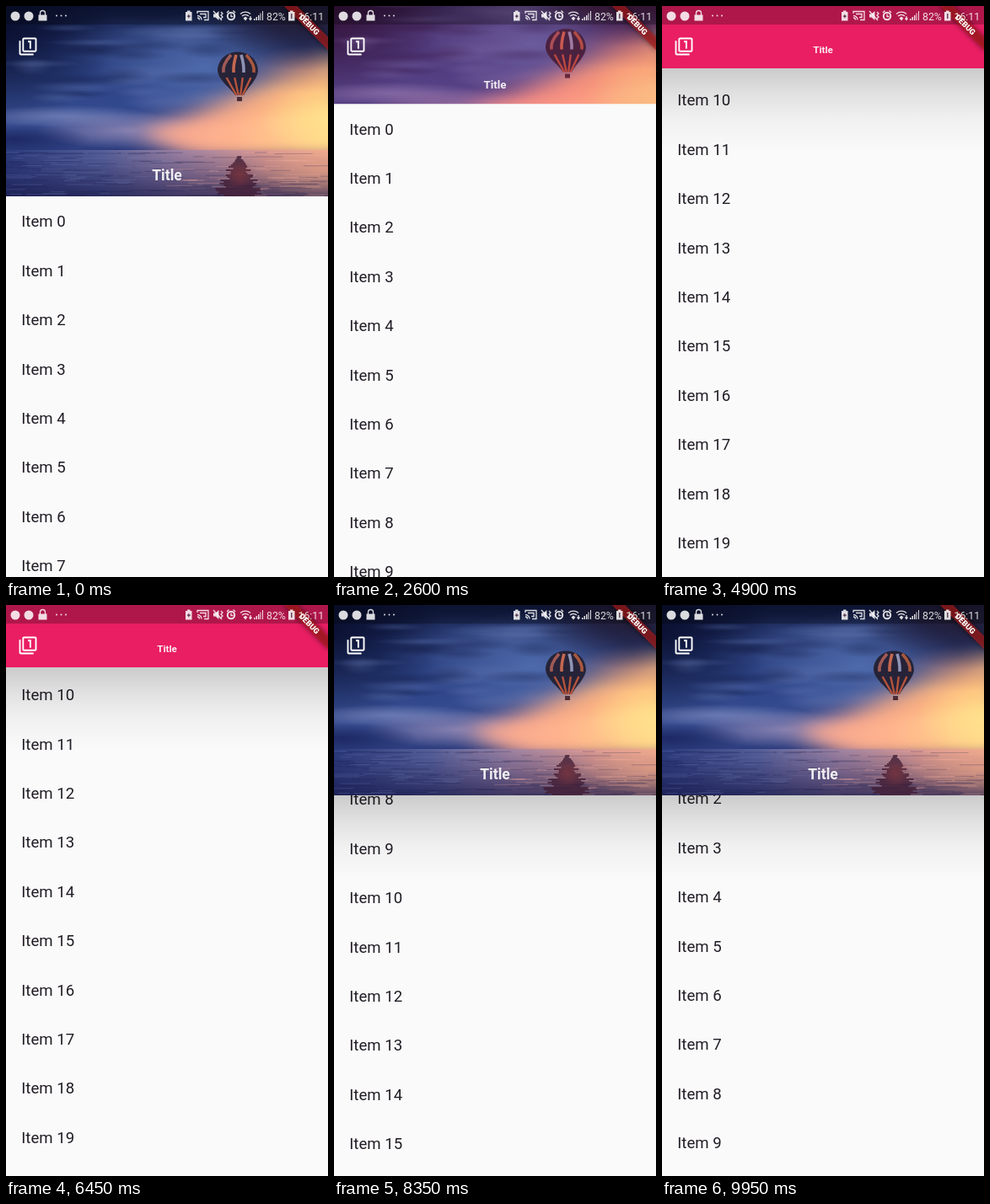
Write an HTML page with a canvas that moves like this. It is 382x678 px and loops after 10 s.

```html
<!DOCTYPE html>
<html lang="en">
<head>
<meta charset="utf-8">
<title>Collapsing app bar</title>
<style>
html, body { margin: 0; width: 100%; height: 100%; overflow: hidden; background: #fafafa; }
canvas { display: block; width: 382px; height: 678px; }
</style>
</head>
<body>
<canvas id="stage"></canvas>
<script>
const W = 382, HEIGHT = 678, LOOP = 10000, STEP = 50;
const MAX_BAR = 226, MIN_BAR = 74, STATUS = 22, ROW = 58.4, PEAK = 743.6;
const FONT = 'Roboto, sans-serif';

const canvas = document.getElementById('stage');
const dpr = window.devicePixelRatio || 1;
canvas.width = W * dpr;
canvas.height = HEIGHT * dpr;
const ctx = canvas.getContext('2d');

const clamp = (v, lo = 0, hi = 1) => Math.min(hi, Math.max(lo, v));
const fling = u => 1.2 * u ** 3 - 3.27 * u ** 2 + 3.07 * u;
const drag = u => u * u * (3 - 2 * u);

// Scroll gestures: start, end, target offset, easing
const gestures = [
  [2300, 2650, 111.5, fling],
  [3300, 4200, 601.7, fling],
  [4500, 5250, PEAK, fling],
  [6350, 6950, 602.6, drag],
  [7800, 8350, 492.2, fling],
  [8850, 9500, 285, fling],
  [9650, 9950, 142.8, drag]
];

function scrollAt(t) {
  let offset = 0;
  for (const [start, end, target, ease] of gestures) {
    if (t < start) break;
    offset += (target - offset) * ease(clamp((t - start) / (end - start)));
  }
  return offset;
}

function barHeight(t, scroll) {
  const hidden = t < 6350 ? scroll : MAX_BAR - (PEAK - scroll);
  return Math.max(MIN_BAR, MAX_BAR - clamp(hidden, 0, MAX_BAR));
}

function random(seed) {
  return () => (seed = (seed * 16807) % 2147483647) / 2147483647;
}

function gradient(c, x0, y0, x1, y1, stops) {
  const g = c.createLinearGradient(x0, y0, x1, y1);
  stops.forEach(([at, color]) => g.addColorStop(at, color));
  return g;
}

function glow(c, x, y, rx, ry, rgb, alpha) {
  c.save();
  c.translate(x, y);
  c.scale(rx, ry);
  const g = c.createRadialGradient(0, 0, 0, 0, 0, 1);
  g.addColorStop(0, `rgba(${rgb},${alpha})`);
  g.addColorStop(0.45, `rgba(${rgb},${alpha * 0.6})`);
  g.addColorStop(1, `rgba(${rgb},0)`);
  c.fillStyle = g;
  c.fillRect(-1, -1, 2, 2);
  c.restore();
}

function softShape(c, path, blur, fill) {
  c.save();
  c.filter = `blur(${blur}px)`;
  c.fillStyle = fill;
  c.fill(new Path2D(path));
  c.restore();
}

function drawBalloon(c) {
  c.save();
  c.beginPath();
  c.moveTo(251, 77);
  c.bezierCurveTo(252, 47, 298, 47, 299, 77);
  c.bezierCurveTo(298, 88, 287, 96, 282, 106);
  c.lineTo(272, 106);
  c.bezierCurveTo(265, 96, 252, 88, 251, 77);
  c.clip();
  c.fillStyle = '#262338';
  c.fillRect(250, 50, 50, 60);
  c.lineWidth = 3.6;
  ['#a05a55', '#c4684f', '#8f93b4', '#a8583f'].forEach((color, i) => {
    const dx = -18 + i * 12;
    c.strokeStyle = color;
    c.beginPath();
    c.moveTo(276 + dx * 0.5, 58);
    c.quadraticCurveTo(276 + dx * 1.1, 70, 276 + dx, 79);
    c.stroke();
    c.strokeStyle = '#b4543c';
    c.lineWidth = 2.4;
    c.beginPath();
    c.moveTo(276 + dx * 0.8, 85);
    c.lineTo(277 + dx * 0.2, 106);
    c.stroke();
    c.lineWidth = 3.6;
  });
  c.restore();
  c.fillStyle = '#4b2c35';
  c.fillRect(274, 108, 6, 5);
}

function makePhoto() {
  const photo = document.createElement('canvas');
  photo.width = W;
  photo.height = MAX_BAR;
  const c = photo.getContext('2d');
  const rnd = random(7);

  // Sky
  c.fillStyle = gradient(c, 0, 0, 0, MAX_BAR, [
    [0, '#111a42'], [0.25, '#263a78'], [0.5, '#31488c'], [0.62, '#3a4f92'], [0.76, '#2d3d7e'], [1, '#1d2860']
  ]);
  c.fillRect(0, 0, W, MAX_BAR);
  glow(c, 235, 72, 125, 65, '95,125,190', 0.7);
  glow(c, 150, 50, 100, 40, '75,100,165', 0.4);
  glow(c, 0, 30, 130, 110, '6,10,38', 0.8);
  for (let i = 0; i < 26; i++) {
    const rgb = rnd() < 0.5 ? '14,20,58' : '105,125,185';
    glow(c, rnd() * 260, 25 + rnd() * 95, 25 + rnd() * 45, 4 + rnd() * 8, rgb, 0.28);
  }
  glow(c, 70, 131, 110, 13, '140,150,200', 0.6);
  glow(c, 145, 148, 110, 22, '165,150,190', 0.7);
  glow(c, 10, 158, 90, 18, '20,30,88', 0.7);

  // Sunset fanning out to the right
  softShape(c, 'M150 151L215 130L290 98L400 55V180H215Z', 13,
    gradient(c, 150, 0, W, 0, [[0, '#cf9aa8'], [0.3, '#efa18f'], [0.65, '#fbb083'], [1, '#ffc57e']]));
  softShape(c, 'M165 150L260 137L400 118V168H240Z', 7,
    gradient(c, 165, 0, W, 0, [[0, 'rgba(245,165,145,.8)'], [0.5, '#ffb48d'], [1, '#ffd98a']]));
  glow(c, 382, 135, 80, 42, '255,226,140', 0.8);
  glow(c, 355, 75, 75, 28, '190,125,115', 0.5);
  glow(c, 355, 15, 120, 62, '38,28,48', 0.85);

  // Water below the horizon
  c.fillStyle = gradient(c, 0, 0, W, 0,
    [[0, '#2b3b7c'], [0.3, '#56609a'], [0.55, '#a184a2'], [0.8, '#dc9a92'], [1, '#f0ad90']]);
  c.fillRect(0, 171, W, 55);
  c.fillStyle = gradient(c, 0, 171, 0, MAX_BAR,
    [[0, 'rgba(35,35,90,0)'], [0.35, 'rgba(35,35,90,.25)'], [1, 'rgba(24,24,72,.72)']]);
  c.fillRect(0, 171, W, 55);
  glow(c, 375, 195, 95, 32, '250,170,135', 0.55);
  for (let i = 0; i < 190; i++) {
    const x = rnd() * W, y = 173 + rnd() * 53, length = 10 + rnd() * 40;
    const light = rnd() < 0.45;
    c.fillStyle = light ? `rgba(${x > 190 ? '250,180,165' : '115,128,188'},.25)` : 'rgba(22,24,72,.26)';
    c.fillRect(x - length / 2, y, length, 1);
  }

  // Reflection of the balloon
  c.fillStyle = 'rgba(66,30,54,.8)';
  for (let y = 178; y < MAX_BAR; y += 2) {
    const half = Math.min(25, 3 + (y - 178) * 0.65) * (0.6 + rnd() * 0.5);
    c.fillRect(275 - half + rnd() * 3, y, half * 2, 2);
  }
  glow(c, 277, 200, 17, 17, '150,60,60', 0.5);
  drawBalloon(c);
  return photo;
}

const photo = makePhoto();
const filterIcon = new Path2D('M3 5H1v16c0 1.1.9 2 2 2h16v-2H3V5zm11 10h2V5h-4v2h2v8zm7-14H7' +
  'c-1.1 0-2 .9-2 2v14c0 1.1.9 2 2 2h14c1.1 0 2-.9 2-2V3c0-1.1-.9-2-2-2zm0 16H7V3h14v14z');
const statusLines = new Path2D('M40.5 11V8.500a3 3 0 0 1 6 0V11' +
  'M227 9V6.500h13v10h-5M227 11.500a5 5 0 0 1 5 5M227 14a2.500 2.500 0 0 1 2.500 2.500M230 9.500h7v4h-3' +
  'M246 6l10 11M255 7l2 2l-2 2l2 2l-2 2M267 9.500v3h2.500M262 8l2.500-2.500M272 8l-2.500-2.500' +
  'M278 9.500a9 9 0 0 1 12 0M280 12a6 6 0 0 1 8 0M290 12v4M288.500 14.500l1.500 2l1.500-2');
const statusFills = new Path2D('M38.500 10.500h10v7h-10zM213 7h2v-1.500h3.500v1.500h2v10.500h-7.500z' +
  'M246 9.500h2.500l4-3.500v11l-4-3.500h-2.500zM281.500 14.500l2.500-2l2.500 2l-2.500 3z' +
  'M294 15h1.500v2h-1.500zM296.500 13h1.500v4h-1.500zM299 11h1.500v6h-1.500zM301.500 8.500h1v8.500h-1z' +
  'M304 6h1v11h-1zM335 7h2v-1.500h3.500v1.500h2v10.500h-7.500z');

function dot(x, y, r) {
  ctx.beginPath();
  ctx.arc(x, y, r, 0, 7);
  ctx.fill();
}

function text(value, x, y, font, color, align = 'left') {
  ctx.font = `${font} ${FONT}`;
  ctx.textAlign = align;
  ctx.textBaseline = 'alphabetic';
  ctx.fillStyle = color;
  ctx.fillText(value, x, y);
}

function drawStatusBar() {
  const ink = 'rgba(255,255,255,.85)';
  ctx.fillStyle = ctx.strokeStyle = ink;
  ctx.lineWidth = 1.3;
  dot(11, 12, 5.5);
  dot(27, 12, 5.5);
  [60, 65.5, 71].forEach(x => dot(x, 11.5, 1));
  ctx.fill(statusFills);
  ctx.stroke(statusLines);
  ctx.lineWidth = 2;
  ctx.beginPath();
  ctx.arc(267, 12, 4.2, 0, 7);
  ctx.stroke();
  ctx.fillStyle = 'rgba(70,30,60,.8)';
  ctx.fillRect(214.8, 11.5, 4, 1.3);
  ctx.fillRect(216.1, 10.2, 1.3, 4);
  ctx.fillRect(338, 9, 1.5, 6);
  text('82%', 309, 16.5, '12.3px', ink);
  text('16:11', 346.5, 16.5, '12.3px', ink);
}

function drawDebugBanner() {
  ctx.save();
  ctx.translate(W, 0);
  ctx.rotate(Math.PI / 4);
  ctx.filter = 'blur(3px)';
  ctx.fillStyle = 'rgba(0,0,0,.5)';
  ctx.fillRect(-37, 26, 74, 11);
  ctx.filter = 'none';
  ctx.fillStyle = 'rgba(183,28,28,.63)';
  ctx.fillRect(-37, 26, 74, 11);
  text('DEBUG', 0, 34.7, '900 9.3px', '#fff', 'center');
  ctx.restore();
}

function drawList(scroll, top) {
  const first = Math.max(0, Math.floor((scroll + top - 290) / ROW));
  for (let i = first; ; i++) {
    const y = 256 - scroll + i * ROW;
    if (y > HEIGHT + 20) break;
    text('Item ' + i, 18.3, y + 6.3, '18.6px', '#211c25');
  }
}

function drawShadow(top, alpha) {
  ctx.globalAlpha = alpha;
  ctx.fillStyle = gradient(ctx, 0, top, 0, top + 100, [
    [0, 'rgba(0,0,0,.19)'], [0.3, 'rgba(0,0,0,.1)'], [0.6, 'rgba(0,0,0,.04)'], [1, 'rgba(0,0,0,0)']
  ]);
  ctx.fillRect(0, top, W, 100);
  ctx.globalAlpha = 1;
}

function drawBar(height) {
  const expanded = (height - MIN_BAR) / (MAX_BAR - MIN_BAR);
  ctx.save();
  ctx.beginPath();
  ctx.rect(0, 0, W, height);
  ctx.clip();
  ctx.fillStyle = '#e91e63';
  ctx.fillRect(0, 0, W, height);
  ctx.globalAlpha = clamp(expanded / 0.342);
  ctx.drawImage(photo, 0, (height - MAX_BAR) / 4);
  ctx.globalAlpha = 1;
  ctx.fillStyle = 'rgba(0,0,0,.25)';
  ctx.fillRect(0, 0, W, STATUS);
  ctx.restore();

  ctx.save();
  ctx.translate(W / 2, height - 22 - 3 * expanded);
  ctx.scale(1 + expanded / 2, 1 + expanded / 2);
  text('Title', 0, 4.2, 'bold 11.7px', 'rgba(255,255,255,.9)', 'center');
  ctx.restore();

  ctx.save();
  ctx.translate(14.6, 36.6);
  ctx.scale(0.95, 0.95);
  ctx.fillStyle = '#fff';
  ctx.fill(filterIcon);
  ctx.restore();
}

function frame(now) {
  const t = Math.floor((now % LOOP) / STEP) * STEP;
  const scroll = scrollAt(t);
  const height = barHeight(t, scroll);
  ctx.setTransform(dpr, 0, 0, dpr, 0, 0);
  ctx.fillStyle = '#fafafa';
  ctx.fillRect(0, 0, W, HEIGHT);
  drawList(scroll, height);
  drawShadow(height, clamp((t - 3350) / 200));
  drawBar(height);
  drawDebugBanner();
  drawStatusBar();
  requestAnimationFrame(frame);
}

requestAnimationFrame(frame);
</script>
</body>
</html>
```
